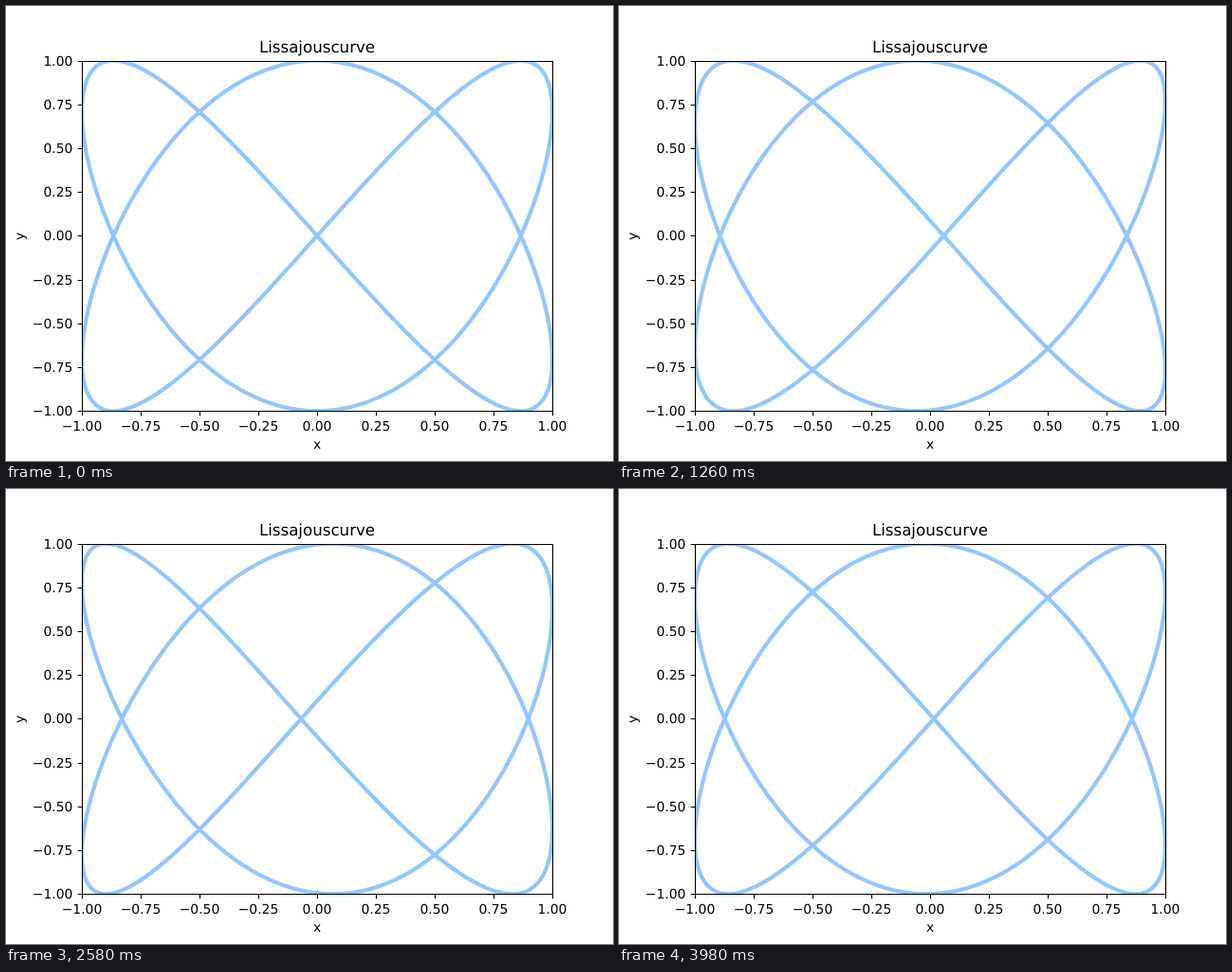
Recreate the animation shown at these times as an HTML page. Size 640x480 px, loop 4000 ms.

```html
<!DOCTYPE html>
<html lang="en">
<head>
<meta charset="utf-8">
<title>Lissajous curve</title>
<style>
  html, body { margin: 0; width: 100%; height: 100%; overflow: hidden; background: #fff; }
  svg { display: block; }
  text { font: 13.889px "DejaVu Sans", sans-serif; text-anchor: middle; text-rendering: geometricPrecision; }
  .title { font-size: 16.667px; }
  .tick { text-anchor: end; }
</style>
</head>
<body>
<svg width="640" height="480" viewBox="0 0 640 480">
  <clipPath id="plot"><rect x="80" y="58" width="497" height="370"/></clipPath>
  <path id="curve" clip-path="url(#plot)" fill="none" stroke="#92c6ff" stroke-width="4.167" stroke-linejoin="round"/>
  <path id="axes" fill="none" stroke="#000" stroke-width="1.111"/>
  <g id="labels">
    <text class="title" x="328" y="49">Lissajouscurve</text>
    <text x="328" y="467">x</text>
    <text transform="translate(19 242.8) rotate(-90)">y</text>
  </g>
</svg>
<script>
const LOOP = 4000, STEP = 20, POINTS = 720;
const curve = document.getElementById("curve");
const labels = document.getElementById("labels");
const toX = v => 328 + 248 * v;
const toY = v => 242.4 - 184.8 * v;
const snap = v => Math.round(v) + 0.5;

function addLabel(value, x, y, name = "") {
  const text = document.createElementNS("http://www.w3.org/2000/svg", "text");
  text.setAttribute("x", x);
  text.setAttribute("y", y);
  text.setAttribute("class", name);
  text.textContent = value.toFixed(2).replace("-", "\u2212");
  labels.append(text);
}

function drawAxes() {
  let d = "M80.5 58.5H576.5V427.5H80.5Z";
  for (let v = -1; v <= 1; v += 0.25) {
    const x = snap(toX(v)), y = snap(toY(v));
    d += `M${x} 427.5v4.86M80.5 ${y}h-4.86`;
    addLabel(v, toX(v), 448);
    addLabel(v, 70.3, y + 4.5, "tick");
  }
  document.getElementById("axes").setAttribute("d", d);
}

function draw(now) {
  const time = Math.floor(now % LOOP / STEP) * STEP;
  const phase = Math.PI * time / LOOP;
  const points = Array.from({ length: POINTS }, (_, i) => {
    const a = 2 * Math.PI * i / POINTS;
    return toX(Math.sin(2 * a + phase)).toFixed(2) + " " + toY(Math.sin(3 * a)).toFixed(2);
  });
  curve.setAttribute("d", "M" + points.join("L") + "Z");
}

function frame() {
  draw(performance.now());
  requestAnimationFrame(frame);
}

drawAxes();
frame();
</script>
</body>
</html>
```
